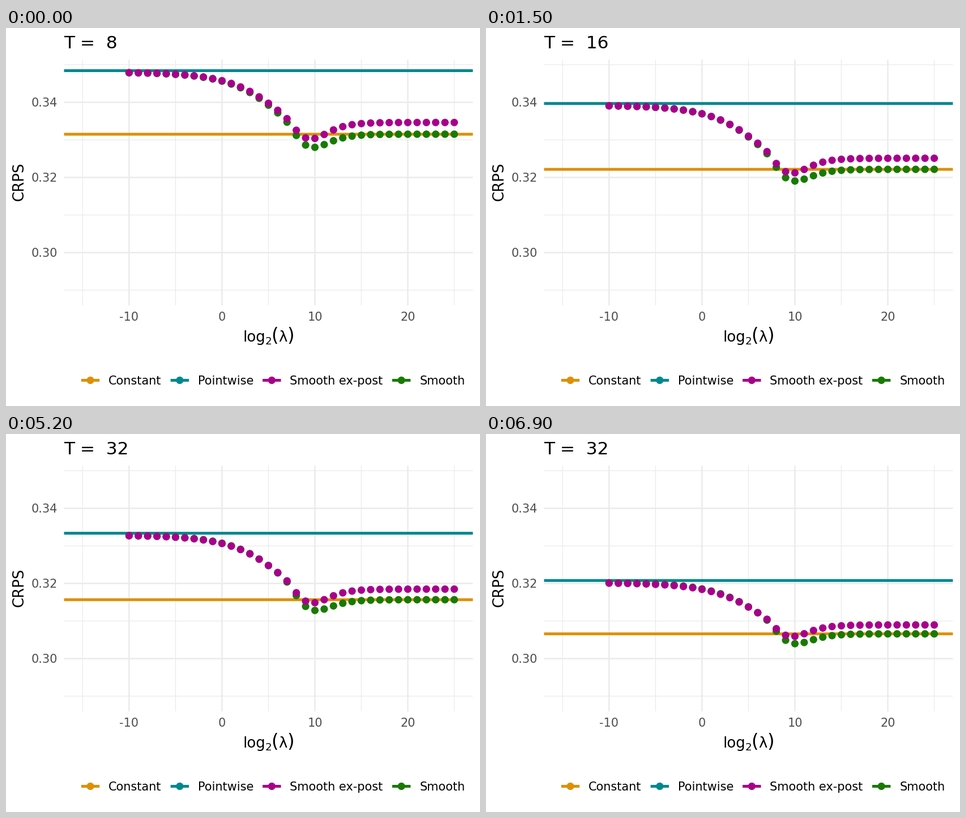
Animation, 837 px wide and 669 px high, one loop 8 s. Source, as a matplotlib script:

```python
import numpy as np
import matplotlib.pyplot as plt
from matplotlib.animation import FuncAnimation

W, H, DPI = 837, 669, 64
PT = 72 / DPI                      # points per pixel
FRAMES, INTERVAL, STEPS = 80, 100, 18
STARTS = (5, 52)                   # first frame of each transition

ORANGE, TEAL, PURPLE, GREEN = "#dd9002", "#008790", "#a7008b", "#187a00"
GRID, TICK = "#ebebeb", "#4d4d4d"
LEFT, RIGHT, TOP, BOTTOM = 102.5, 824.4, 56, 491
LINE, RADIUS = 5, 6.6
SMALL, MEDIUM, LARGE = 20.83, 26.04, 31.25
ADVANCE = {".": 0.318, "-": 0.361}  # in em; digits take 0.636

# One entry per state T = 8, 16, 32; heights in pixels.
# Curves: left level, right level, rebound after the dip, steepness.
EXPOST = ((78.2, 167.2, 75, 1.0), (174.4, 270.8, 68, 0.97), (263.4, 337.9, 56, 0.97))
SMOOTH = ((78.4, 187.9, 67, 0.97), (174.1, 289.7, 65, 0.87), (262.7, 353.7, 61, 0.82))
POINTWISE = (75.5, 170.7, 259.3)
CONSTANT = (188, 289.7, 353.7)

plt.rcParams["font.family"] = "DejaVu Sans"


def px(k):
    return 381.4 + 16.406 * k


def py(v):
    return 131.5 + (0.34 - v) * 6650


def curve(k, left, right, rebound, steep):
    """Saturating fall from left, then a logistic rebound to right."""
    rate = 0.0965 * np.exp(0.3 * k) + 0.1 * np.maximum(0, k - 6.45) ** 2
    fall = 1 - np.exp(-steep * rate)
    back = 1 / (1 + 2.0 ** (9.8 - k))
    return left + (right - left + rebound) * fall - rebound * back


fig = plt.figure(figsize=(W / DPI, H / DPI), dpi=DPI, facecolor="white")
ax = fig.add_axes([0, 0, 1, 1])
ax.set_xlim(0, W)
ax.set_ylim(H, 0)
ax.axis("off")


def line(xs, ys, color, width, z):
    return ax.plot(xs, ys, color=color, lw=width * PT, zorder=z,
                   solid_capstyle="butt", snap=False)[0]


def dots(xs, ys, colors, z):
    # one size per dot keeps sub-pixel positions
    sizes = np.full(len(xs), (2 * RADIUS * PT) ** 2)
    return ax.scatter(xs, ys, s=sizes, c=colors, linewidths=0, zorder=z)


def label(x, y, text, size, color="black", **kw):
    return ax.text(x, y, text, fontsize=size * PT, color=color,
                   va="baseline", ha="left", **kw)


def tick(x, y, text, align):
    width = SMALL * sum(ADVANCE.get(c, 0.636) for c in text)
    label(x - align * width, y, text, SMALL, TICK)


# Grid and axes
for k in range(-15, 26, 5):
    major = k % 10 == 0
    line([px(k)] * 2, [TOP, BOTTOM], GRID, 2.53 if major else 1.27, 1 + major)
    if major:
        tick(px(k), 518, str(k), 0.5)
for c in range(29, 36):
    y, major = py(c / 100), c % 2 == 0
    line([LEFT, RIGHT], [y] * 2, GRID, 2.53 if major else 1.27, 1 + major)
    if major:
        tick(90.8, y + 7.6, f"{c / 100:.2f}", 1)

label(30.5, 306.2, "CRPS", MEDIUM, rotation=90, rotation_mode="anchor")
for x, y, text, size in ((418.3, 555, "log", MEDIUM), (457.3, 560, "2", 18.2),
                         (468.3, 555, "(", 32.5), (481.4, 555, "λ", MEDIUM),
                         (496.4, 555, ")", 32.5)):
    label(x, y, text, size)

# Legend
KEYS = ((149, "Constant", ORANGE), (306.8, "Pointwise", TEAL),
        (469.3, "Smooth ex-post", PURPLE), (698.2, "Smooth", GREEN))
for x, name, color in KEYS:
    line([x - 16.2, x + 16.2], [623.5] * 2, color, LINE, 3)
    label(x + 32.1, 631.1, name, SMALL)
dots([k[0] for k in KEYS], [623.5] * 4, [k[2] for k in KEYS], 4)

# Moving parts
lam = np.arange(-10, 26)
n = len(lam)
curves = [np.concatenate([curve(lam, *s), curve(lam, *e)])
          for s, e in zip(SMOOTH, EXPOST)]
xs = np.tile(px(lam), 2)
title = label(102.6, 36, "", LARGE)
teal = line([LEFT, RIGHT], [0, 0], TEAL, LINE, 5)
orange = line([LEFT, RIGHT], [0, 0], ORANGE, LINE, 5)
points = dots(xs, curves[0], [GREEN] * n + [PURPLE] * n, 6)


def blend(rows, p):
    i = min(int(p), 1)
    return rows[i] + (rows[i + 1] - rows[i]) * (p - i)


def draw(frame):
    p = sum(min(max(frame - s + 1, 0), STEPS) / STEPS for s in STARTS)
    goal = 8 * 2 ** sum(frame >= s for s in STARTS)
    title.set_text(f"T =  {goal}")
    teal.set_ydata([blend(POINTWISE, p)] * 2)
    orange.set_ydata([blend(CONSTANT, p)] * 2)
    points.set_offsets(np.column_stack([xs, blend(curves, p)]))
    return title, teal, orange, points


anim = FuncAnimation(fig, draw, frames=FRAMES, interval=INTERVAL,
                     init_func=lambda: draw(0), repeat=True, repeat_delay=0)
plt.show()
```
